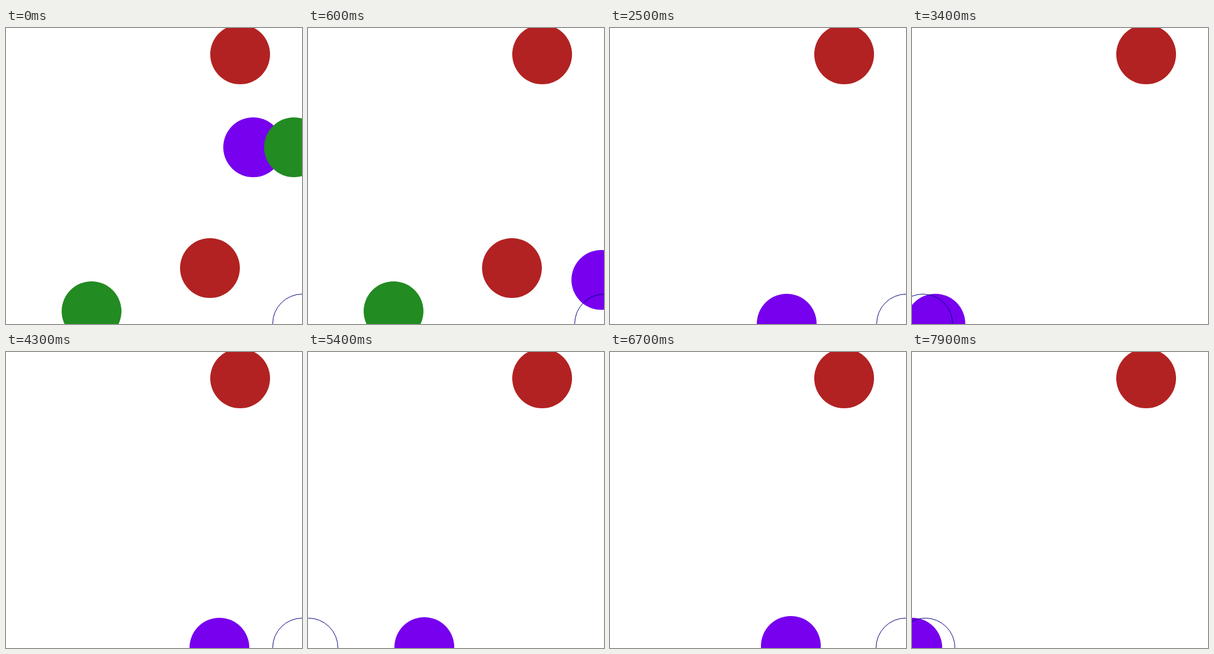
An HTML page with a canvas that plays this animation: 500x500 px, repeating every 8000 ms.

```html
<!DOCTYPE html>
<html lang="en">
<head>
<meta charset="utf-8">
<title>Bouncing agent</title>
<style>
  html, body { margin: 0; width: 100%; height: 100%; overflow: hidden; background: #fff; }
  canvas { display: block; width: 500px; height: 500px; }
</style>
</head>
<body>
<canvas id="stage" width="500" height="500"></canvas>
<script>
const ctx = document.getElementById('stage').getContext('2d');
const LOOP = 8000, STEP = 100, WALL = 500, FLOOR = 499, R = 50;
const RED = '#b22222', GREEN = '#228b22', PURPLE = '#7700ee', NAVY = '#000080';

const items = [
  { x: 395, y: 44, colour: RED, gone: Infinity },
  { x: 486, y: 201, colour: GREEN, gone: 100 },
  { x: 344, y: 405, colour: RED, gone: 1800 },
  { x: 144, y: 478, colour: GREEN, gone: 2000 }
];

// The agent lands at the right wall, runs left, then rebounds off the left wall
const LAND = 800, HIT = 2010;
const rebounds = [
  { start: HIT, end: 3335, peak: 304, skew: 0.845 },
  { start: 3335, end: 5775, peak: 376.4, skew: 1 },
  { start: 5775, end: 7830, peak: 305, skew: 0.845 }
];

// The ring changes side shortly after each turn of the agent
const DELAY = 10, CROSS = 476;
const topTime = r => r.start + (r.end - r.start) * 0.5 ** (1 / r.skew);
const turns = [LAND, HIT, ...rebounds.flatMap(r => [topTime(r), r.end])];

const progress = (t, start, end) => Math.max(0, Math.min(1, (t - start) / (end - start)));
const smooth = u => u * u * (3 - 2 * u);

function agentX(t) {
  if (t < LAND) return WALL - 83 * (1 - t / LAND) ** 2;
  if (t < HIT) return WALL * (1 - progress(t, LAND, HIT) ** 3.674);
  const r = rebounds.find(r => t < r.end);
  if (!r) return 0;
  const s = progress(t, r.start, r.end) ** r.skew;
  return r.peak * 4 * s * (1 - s);
}

function agentY(t) {
  if (t < LAND) return FLOOR - 298 * (1 - t / LAND);
  const lift = t > 2500 ? 3.6 * Math.sin(Math.PI * (t - 2500) / 900) ** 2 : 0;
  return FLOOR - lift;
}

function ringX(t) {
  return turns.reduce((x, turn, i) => {
    const moved = WALL * smooth(progress(t, turn + DELAY, turn + DELAY + CROSS));
    return i % 2 ? x + moved : x - moved;
  }, WALL);
}

function circle(x, y, r) {
  ctx.beginPath();
  ctx.arc(Math.round(x) + 0.5, Math.round(y) + 0.5, r, 0, 2 * Math.PI);
}

function disc(x, y, colour) {
  circle(x, y, R + 0.5);
  ctx.fillStyle = colour;
  ctx.fill();
}

function ring(x, y) {
  circle(x, y, R);
  ctx.strokeStyle = NAVY;
  ctx.lineWidth = 1;
  ctx.stroke();
}

function draw(t) {
  ctx.fillStyle = '#fff';
  ctx.fillRect(0, 0, 500, 500);
  disc(agentX(t), agentY(t), PURPLE);
  for (const { x, y, colour, gone } of items) if (t < gone) disc(x, y, colour);
  ring(ringX(t), FLOOR);
}

const begin = performance.now();
function tick() {
  const t = Math.max(0, performance.now() - begin) % LOOP;
  draw(Math.floor(t / STEP) * STEP);
  requestAnimationFrame(tick);
}
draw(0);
requestAnimationFrame(tick);
</script>
</body>
</html>
```
